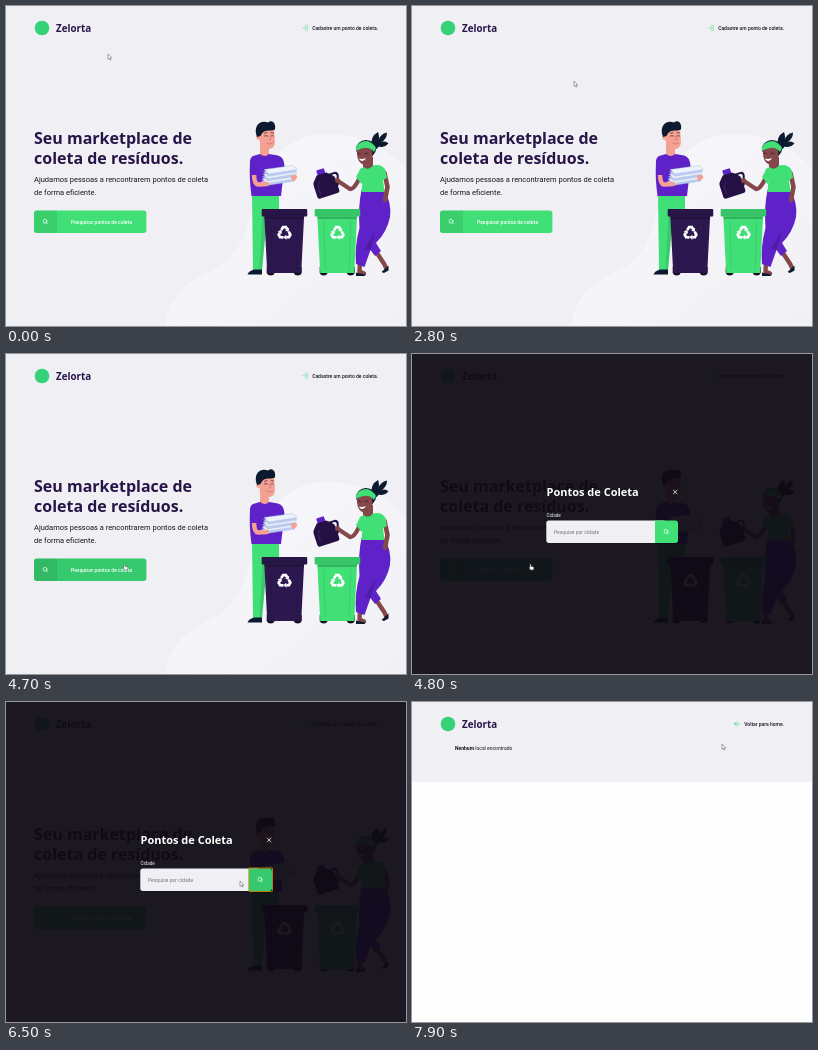
These frames come from a looping animation (400 px wide and 320 px high, 8000 ms). An HTML page:

```html
<!DOCTYPE html>
<html lang="pt-BR">
<head>
<meta charset="utf-8">
<title>Coleta de resíduos</title>
<style>
  html, body { margin: 0; width: 100%; height: 100%; overflow: hidden; background: #fefefe; }
  svg { display: block; width: 100vw; height: 100vh; }
  text { font: 5px Roboto, sans-serif; fill: #17131f; }
  .head { font-family: "Noto Sans", sans-serif; font-weight: 700; fill: #271548; }
  .bold { font-weight: 500; }
  .lead { font-size: 7.5px; }
  .title { font-size: 16px; }
  .logo { font-size: 9.8px; }
  .fallback text { font-family: "Liberation Sans", Arial, sans-serif; }
  .line { fill: none; stroke-linecap: round; stroke-linejoin: round; }
  .skin { fill: #f4a093; }
  .brown { fill: #84474a; }
  .ink { fill: #0b1a2e; }
  .violet { fill: #5f22c9; }
  .green { fill: #40e077; }
</style>
</head>
<body>
<svg viewBox="0 0 400 320" preserveAspectRatio="none">
  <defs>
    <linearGradient id="glow" x1="0" y1="0" x2="1" y2="1">
      <stop offset=".2" stop-color="#f7f6fa"/><stop offset="1" stop-color="#f1f0f5"/>
    </linearGradient>
    <g id="turn">
      <path d="M-3-2.8-1.3-5.5H1.3L2.5-3.5" fill="none" stroke="#fff" stroke-width="2.5"/>
      <path d="M4.4-4.8 .6-2.4 3.9-.9Z" fill="#fff"/>
    </g>
    <g id="bin">
      <path d="M5 58h8v6q-1 2.500-4 2.500t-4-2.500ZM32 58h8v6q-1 2.500-4 2.500t-4-2.500Z" fill="#14101f"/>
      <path d="M2.500 5H42.500L39.500 64H5.500Z" fill="currentColor"/>
      <path d="M2.700 7.500H42.300L42 10H3Z" opacity=".2"/>
      <path d="M9 13 10.500 60M36 13 34.500 60" class="line" stroke="#000" stroke-width=".6" opacity=".15"/>
      <rect width="45.500" height="7.500" rx="1" fill="currentColor"/>
      <rect width="45.500" height="7.500" rx="1" opacity=".12"/>
      <g transform="translate(22.800 24) scale(1.080)">
        <use href="#turn"/><use href="#turn" transform="rotate(120)"/><use href="#turn" transform="rotate(240)"/>
      </g>
    </g>
    <g id="lens" class="line" stroke="#fff" stroke-width=".7">
      <circle r="1.900"/><path d="M1.400 1.400 2.600 2.600"/>
    </g>
  </defs>

  <rect width="400" height="320" fill="#fefefe"/>
  <rect id="back" width="400" height="320" fill="#f0eff4"/>

  <g id="home">
    <path d="M160 320C160 298 175 278 205 265C232 253 238 232 248 195C256 163 276 128 322 128C355 128 385 144 400 163V320Z" fill="url(#glow)"/>

    <path class="line" stroke="#5fdc92" stroke-width=".55" d="M296.500 21.800H300.200M298.800 20.300 300.300 21.800 298.800 23.300M299.500 19.200H301.500V24.400H299.500"/>
    <text x="372" y="23.700" text-anchor="end" class="bold">Cadastre um ponto de coleta.</text>

    <text x="28" y="138" class="head title">Seu marketplace de</text>
    <text x="28" y="157.500" class="head title">coleta de resíduos.</text>
    <text x="28" y="176.300" class="lead">Ajudamos pessoas a rencontrarem pontos de coleta</text>
    <text x="28" y="188.500" class="lead">de forma eficiente.</text>

    <rect id="cta" x="28" y="204.500" width="112.400" height="22.500" rx="2.700"/>
    <path d="M51 204.500H30.700Q28 204.500 28 207.200V224.300Q28 227 30.700 227H51Z" opacity=".08"/>
    <use href="#lens" x="39" y="215.300"/>
    <text x="65" y="217.600" class="bold" style="fill:#fff">Pesquisar pontos de coleta</text>

    <!-- man -->
    <g>
      <path class="green" d="M246 188H273V206H261.500L256 264H247Z"/>
      <path d="M256.500 206H261.500L256 264H253.500Z" opacity=".1"/>
      <path class="ink" d="M241.500 268.500Q242.500 265 248 263.500H256V268.500Z"/>
      <path class="skin" d="M254 136H263V151H254Z"/>
      <path class="violet" d="M247 150 254 148Q259 152 263 148L272 149.500Q278 151 278.500 160L275 190H245.500Q243 172 244 156Q244 151.500 247 150Z"/>
      <path class="skin" d="M253 125Q260 120 268 123L269 136Q268.500 143 263 143Q257 142 253.500 135Z"/>
      <circle class="skin" cx="252.500" cy="131.500" r="2.200"/>
      <path class="ink" d="M251 131C246.500 119 255 113.500 262 116.500C267 113 270 118 269 123.500C263 126 258 122 254.500 130Z"/>
      <path class="line" stroke="#2a1522" stroke-width=".6" d="M258.500 130Q260 129 261.500 130M265 130Q266.500 129 267.500 130M258.500 127.300 261 126.700M265 126.700 267.500 127"/>
      <path class="line" stroke="#cf6f68" stroke-width=".7" d="M263.500 130 264.700 133.500 263.200 134M261 137.500Q264 139 266.500 137"/>
      <g id="papers"></g>
      <path class="line" stroke="#f4a093" stroke-width="4.600" d="M248 167Q248 178 252 178.500L261 178"/>
      <path class="violet" d="M244 155Q249 150 252.500 158L252 169H244.200Z"/>
      <path class="skin" d="M285 170Q290 167 291.500 171L288.500 175Q285 175 285 170Z"/>
    </g>

    <!-- woman -->
    <g>
      <path class="line" stroke="#84474a" stroke-width="4.400" d="M369 244 378.500 258.500 380 262M354 255 353.500 265.500 358 267.500"/>
      <path class="ink" d="M375.500 266 382.500 259.500V264.500L378 267ZM350 266.500 359 268.500 358.500 270H350Z"/>
      <path class="violet" d="M355.500 184H378Q386 197 384 211Q381 226 370 237L375 245 369 250 364.500 244 358.500 261 350 258Q348.500 240 353.500 222Q352 200 355.500 184Z"/>
      <path d="M364.500 244 370 224 359 243Z" opacity=".18"/>
      <path class="line" stroke="#84474a" stroke-width="4.600" d="M378.500 167 381.500 181 379 194"/>
      <g class="ink">
        <ellipse cx="360" cy="143" rx="10" ry="9"/>
        <path d="M365 143Q364 130 372 126Q374 131 372 135Q374 128 381 126.500Q381 133 375 136.500Q379 134 382.500 137.500Q378 142.500 373 140.500Q370 145 365 143Z"/>
      </g>
      <path class="brown" d="M357 151H367V164H357Z"/>
      <path class="green" d="M354 163Q360 158 366 160Q375 157 379.500 164L381 172 377 174 378.500 186H355.500L356.500 175 351 171Z"/>
      <path class="brown" d="M357.500 161Q362 165 366.500 160L365.500 157H357.500Z"/>
      <path class="brown" d="M351 142Q358 138 366 142L366.500 150Q364 158.500 357 158.500Q351.500 156 351 148Z"/>
      <path class="green" d="M349.500 142.500Q352 135 361 135Q367 136.500 370 142L368 146Q362 138.500 350.500 144.500Z"/>
      <path class="line" stroke="#1d0d12" stroke-width=".6" d="M352 147.500Q353.300 146.400 354.500 147.500M359 147.500Q360.500 146.400 362 147.500"/>
      <path d="M353 152.500Q356 153.500 360 152Q358.500 155.300 356 155Q353.800 154.600 353 152.500Z" fill="#fff"/>
      <path class="line" stroke="#84474a" stroke-width="4.200" d="M354 171Q348 184 344 183L332 175"/>
      <path class="green" d="M355 162.500 350 171 355.500 178 360 172Z"/>
    </g>

    <!-- jug -->
    <g transform="rotate(-18 319 179)">
      <rect class="violet" x="315" y="162.500" width="8" height="6" rx="1"/>
      <path fill="#241043" d="M314 167.500H324L329 172Q331 173.500 331 176V188Q331 190.500 328.500 190.500H310.500Q308 190.500 308 188V176Q308 173.500 310 172Z"/>
      <path class="line" stroke="#241043" stroke-width="2" d="M325 170.500H332Q334.500 171 334 174L331 183"/>
      <path class="line" stroke="#4c3478" stroke-width=".6" d="M312 186V179Q312 176 315 174.500"/>
    </g>
    <circle class="brown" cx="331.500" cy="174.500" r="2.500"/>

    <use href="#bin" x="255.700" y="203" color="#2c184f"/>
    <use href="#bin" x="308.700" y="203" color="#40e077"/>
  </g>

  <g id="result">
    <path id="arrow" class="line" stroke="#40d67c" stroke-width=".75" d="M327.500 21.800H322.600M324.800 19.500 322.500 21.800 324.800 24.100"/>
    <text x="372" y="23.700" text-anchor="end" class="bold">Voltar para home.</text>
    <text x="43" y="48.200"><tspan font-weight="700">Nenhum</tspan> local encontrado</text>
  </g>

  <circle cx="36" cy="22" r="7.300" fill="#36d277"/>
  <text x="50" y="25.500" class="head logo">Zelorta</text>

  <g id="modal">
    <rect width="400" height="320" fill="#0e0a14" opacity=".937"/>
    <text x="134.500" y="141.600" class="head" style="font-size:11px;fill:#fff">Pontos de Coleta</text>
    <path class="line" stroke="#fff" stroke-width=".8" d="M261.400 136.200 265 139.800M265 136.200 261.400 139.800"/>
    <text x="134.500" y="163" style="font-size:4.600px;fill:#f0f0f5">Cidade</text>
    <rect x="134.300" y="166.500" width="120" height="22.500" rx="2.700" fill="#f0eff4"/>
    <text x="142" y="179.500" style="fill:#77757d">Pesquise por cidade</text>
    <path id="find" d="M243 166.500H263.300Q266 166.500 266 169.200V186.300Q266 189 263.300 189H243Z"/>
    <use href="#lens" x="254" y="177.300"/>
    <rect id="ring" x="242.600" y="166" width="23.900" height="23.500" rx="1" fill="none" stroke="#e59700" stroke-width=".8"/>
  </g>

  <g id="cursor" fill="#fff" stroke="#4a4952" stroke-width=".6" stroke-linejoin="round">
    <path id="point" transform="scale(.8)" d="M0 0V6.600L1.500 5.300 2.600 7.600 3.600 7.100 2.600 4.900H4.700Z"/>
    <path id="hand" transform="scale(.85)" d="M0 .5Q.7-.4 1.300.5V2.700L4 3.400Q4.800 3.800 4.500 5L3.800 7H.7L-1.200 4.400Q-.9 3.500 0 4.100Z"/>
  </g>
</svg>
<script>
const LOOP = 8000, TICK = 100;
const GREEN = '#40e077', DEEP = '#37c96e';
const $ = id => document.getElementById(id);

// time, x, y; the pointer eases between neighbours
const path = [
  [0, 102, 48], [1000, 162, 75], [3600, 162, 75], [3700, 146, 72], [3800, 146, 72],
  [4600, 118, 210], [5000, 118, 210], [5500, 308, 190], [5800, 254, 177],
  [6300, 254, 177], [6400, 250, 178], [6500, 234, 179], [6600, 214, 179],
  [7200, 207, 159], [7300, 206, 158], [7400, 206, 158], [7900, 310, 42], [8000, 310, 42]
];

$('papers').innerHTML = [5, 4, 3, 2, 1, 0].map(i =>
  `<path transform="translate(${-i * .5} ${i * 2.3})" d="M258 163.500 287 159.500 291.500 163.500 263 168Z" ` +
  `fill="${i % 2 ? '#bccdf0' : '#eef2fb'}" stroke="#a3b7e2" stroke-width=".4"/>`).join('');

const show = (id, on) => $(id).style.display = on ? '' : 'none';
const within = (t, a, b) => t >= a && t < b;

function place(t) {
  const i = path.findIndex(p => p[0] > t);
  const [t0, x0, y0] = path[i - 1], [t1, x1, y1] = path[i];
  const k = (t - t0) / (t1 - t0), e = k * k * (3 - 2 * k);
  return [x0 + (x1 - x0) * e, y0 + (y1 - y0) * e];
}

function draw(t) {
  const done = t >= 6600, swapped = t >= 7500;
  const overCta = within(t, 4500, 5100), overFind = within(t, 5800, 6400);
  show('home', !done);
  show('result', done);
  show('modal', within(t, 4800, 6600));
  show('ring', t >= 6100);
  show('hand', overCta || overFind);
  show('point', !overCta && !overFind);
  $('back').setAttribute('height', done ? 80 : 320);
  $('cta').setAttribute('fill', overCta ? DEEP : GREEN);
  $('find').setAttribute('fill', t >= 5800 ? DEEP : GREEN);
  $('result').setAttribute('class', swapped ? '' : 'fallback');
  $('arrow').setAttribute('transform', `translate(${swapped ? 0 : -2.6} 0)`);
  $('cursor').setAttribute('transform', `translate(${place(t)})`);
}

const start = performance.now();
function frame() {
  const t = (performance.now() - start) % LOOP;
  draw(Math.floor(t / TICK) * TICK);
  requestAnimationFrame(frame);
}
frame();
</script>
</body>
</html>
```
